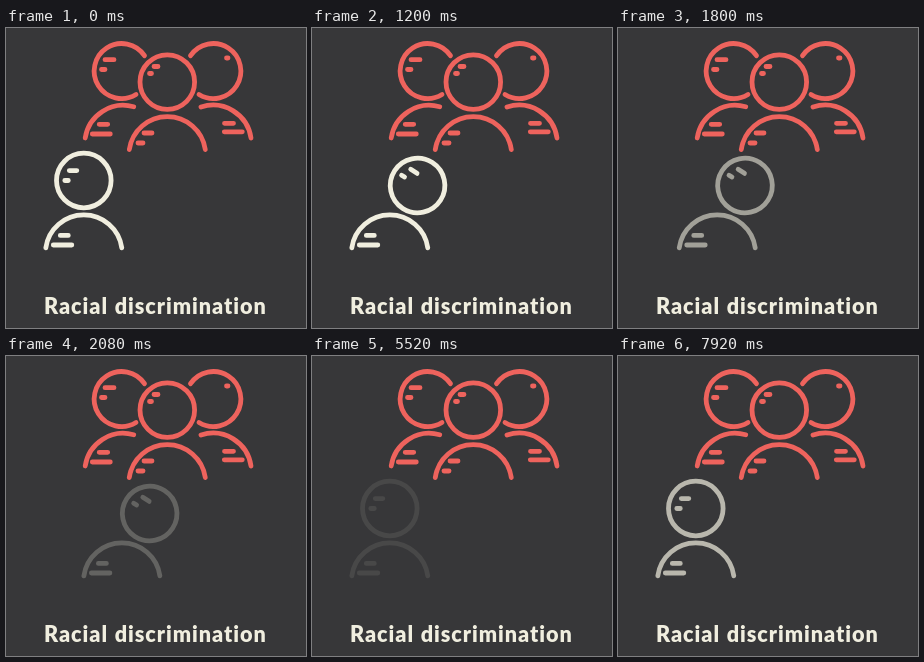
An HTML page that plays this animation: 300 by 300 pixels, repeating every 8000 ms.

```html
<!DOCTYPE html>
<html lang="en">
<head>
<meta charset="utf-8">
<title>Racial discrimination</title>
<style>
  html, body { margin: 0; height: 100%; overflow: hidden; background: #373739; }
  svg { display: block; width: 100vw; height: 100vh; }
  g { fill: none; stroke-width: 4.8; stroke-linecap: round; }
  text { font: 900 21.6px Lato, "Open Sans", sans-serif; letter-spacing: .95px; word-spacing: .8px; fill: #f0eedf; }
</style>
</head>
<body>
<svg viewBox="0 0 300 300">
  <g stroke="#ee635d">
    <path d="M138.5 27.7A27.5 27.5 0 1 0 130 66.5M184.5 27.7A27.5 27.5 0 1 1 193 66.5"/>
    <path d="M79.2 110A38.4 38.4 0 0 1 127.7 78.8M245 110A38.4 38.4 0 0 0 195 79"/>
    <circle cx="161.3" cy="54.1" r="27.3"/>
    <path d="M123.3 121.5A38.4 38.4 0 0 1 199.3 121.5"/>
    <path d="M99 31.7h9M95.5 41.5h3.5M148 38.5h4M143.5 45.5h2M220.5 30h1.5"/>
    <path d="M93.2 96.3h8.5M86.3 106h18M218.5 95.3h9M218.3 103.8h18M138 105h8M132 115h5"/>
  </g>
  <g id="person" stroke="#f0eedf">
    <path d="M39.8 219.8A38.4 38.4 0 0 1 115.8 219.8M54.3 207.4h8M47.3 217h18.5"/>
    <g id="head">
      <circle cx="77.8" cy="152.5" r="27.3"/>
      <path d="M63.3 142.6h7.5M58.8 152.5h3.5"/>
    </g>
  </g>
  <text x="38" y="286">Racial discrimination</text>
</svg>
<script>
  const LOOP = 8000, STEP = 40;
  const person = document.getElementById('person');
  const head = document.getElementById('head');
  const fadeSteps = [5520, 5880, 6240, 6600, 6920, 7240, 7920];

  const progress = (t, from, to) => Math.min(1, Math.max(0, (t - from) / (to - from)));
  const smooth = p => p * p * (3 - 2 * p);

  function draw(t) {
    const back = t >= fadeSteps[0];
    const roll = back ? 0 : smooth(progress(t, 480, 1200));
    const leave = back ? 0 : progress(t, 1440, 2280);
    const level = fadeSteps.filter(s => s <= t).pop();

    // The head rolls along the shoulders, turning further than its path.
    head.setAttribute('transform', `rotate(${20.3 * roll} 77.8 232.5) rotate(${12.5 * roll} 77.8 152.5)`);
    person.setAttribute('transform', `translate(${50 * leave})`);
    person.setAttribute('opacity', back ? 0.09 + 0.61 * progress(level, 5520, 7920) : 1 - leave);
  }

  const start = performance.now();
  function tick() {
    const t = (performance.now() - start) % LOOP;
    draw(Math.floor(t / STEP) * STEP);
    requestAnimationFrame(tick);
  }
  tick();
</script>
</body>
</html>
```
